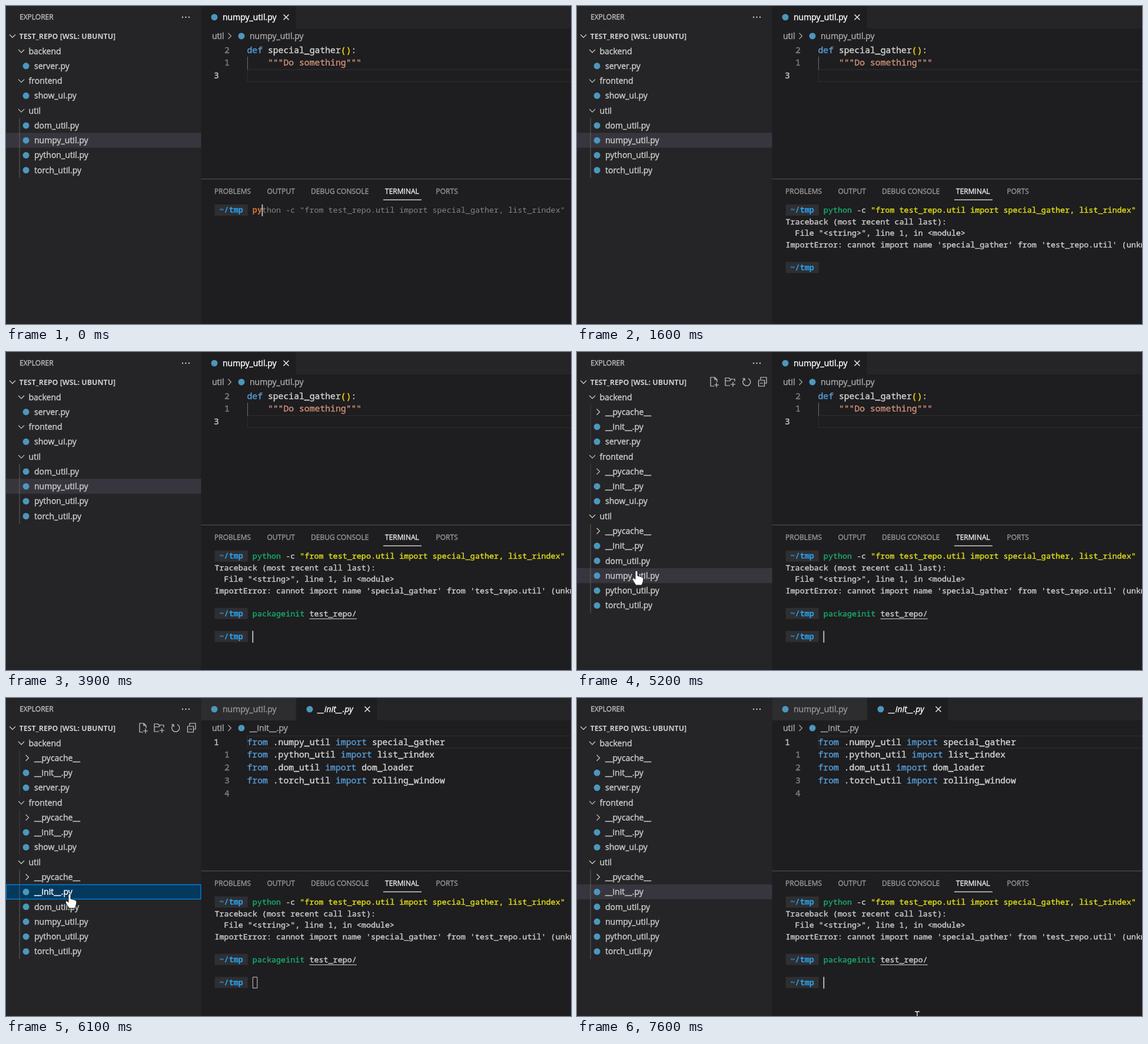
An HTML page with a canvas for the animation above (8000 ms loop, 960 by 540 pixels).

```html
<!DOCTYPE html>
<html lang="en">
<head>
<meta charset="utf-8">
<title>Editor and terminal</title>
<style>
html, body { margin: 0; width: 960px; height: 540px; overflow: hidden; background: #1e1d1f; }
canvas { display: block; }
</style>
</head>
<body>
<canvas width="960" height="540"></canvas>
<script>
const c = document.querySelector('canvas').getContext('2d');
const LOOP = 8000;
const UI = '"Open Sans", "Noto Sans", sans-serif';
const MONO = '"Noto Sans Mono", "DejaVu Sans Mono", monospace';
const LABEL = `14px ${UI}`, CAPS = `12px ${UI}`;
const CODE = `14.75px ${MONO}`, TERM = `13.41px ${MONO}`, TERM_BOLD = `bold ${TERM}`;
const BACK = '#1e1d1f', SIDE = '#252426', SELECTED = '#37363e';
const TEXT = '#ccc', DIM = '#969696', PLAIN = '#d4d4d4', KEY = '#569cd6', STR = '#ce9178';
const GREEN = '#16a96c', YELLOW = '#dede18', GHOST = '#858585', BAD = '#c8743c';

// Moments of the session, in ms
const T = {
  runPython: 100, enter1: 700, trace: 1000, prompt1: 1100, typeP: 1900, typeA: 2000,
  runInit: 2700, enter2: 3400, prompt2: 3800, refresh: 4400, hover: 4500,
  click: 5700, focus: 7400
};

const MOUSE = [[T.hover, 230, 430], [5200, 101, 371], [T.click, 108, 332],
  [6100, 108, 332], [6800, 578, 538]];

const rect = (x, y, w, h, color) => { c.fillStyle = color; c.fillRect(x, y, w, h); };

function line(d, color, width = 1.2) {
  c.strokeStyle = color;
  c.lineWidth = width;
  c.stroke(new Path2D(d));
}

// Draws pairs of string and colour one after another, with a thin outline for weight
function text(x, y, font, ...runs) {
  c.font = font;
  c.lineWidth = 0.4;
  c.lineJoin = 'round';
  for (let i = 0; i < runs.length; i += 2) {
    const [s, color] = runs.slice(i, i + 2);
    c.fillStyle = c.strokeStyle = color;
    c.fillText(s, x, y);
    if (color !== GHOST && !font.startsWith('bold')) c.strokeText(s, x, y);
    x += c.measureText(s).width;
  }
}

function dot(x, y, r, color) {
  c.fillStyle = color;
  c.beginPath();
  c.arc(x, y, r, 0, 7);
  c.fill();
}

const fileIcon = (x, y) => dot(x, y, 5.5, '#4b97bd');
const chevronDown = (x, y) => line(`M${x - 5} ${y - 2.5}l5 5l5-5`, TEXT);
const chevronRight = (x, y, color = TEXT) => line(`M${x - 2.5} ${y - 5}l5 5l-5 5`, color);

function mouseAt(t) {
  const i = MOUSE.findIndex(k => k[0] > t);
  if (i < 0) return MOUSE[MOUSE.length - 1].slice(1);
  const [t0, x0, y0] = MOUSE[i - 1], [t1, x1, y1] = MOUSE[i];
  const p = (t - t0) / (t1 - t0), e = p * p * (3 - 2 * p);
  return [x0 + (x1 - x0) * e, y0 + (y1 - y0) * e];
}

const PACKAGES = [
  ['backend', 'server.py'],
  ['frontend', 'show_ui.py'],
  ['util', 'dom_util.py', 'numpy_util.py', 'python_util.py', 'torch_util.py']
];

function sidebar(t, mouse) {
  const fresh = t >= T.refresh, opened = t >= T.click;
  const rowY = i => 76.5 + 25.28 * i;
  const inTree = mouse && mouse[0] < 331;
  const selected = opened ? 10 : fresh ? 12 : 6;
  const focused = opened && t < T.focus;

  rect(0, 0, 331.5, 540, SIDE);
  text(23, 23, CAPS, 'EXPLORER', '#bbb');
  for (const x of [300, 305.5, 311]) dot(x, 19, 1.2, TEXT);
  chevronDown(11, 51);
  text(22.5, 55.5, `bold 12.4px ${UI}`, 'TEST_REPO [WSL: UBUNTU]', TEXT);
  if (inTree || focused) {
    line('M233 58h-6V43h7l4 4v4M234 43v4h4M237 52v8M233 56h8', TEXT);
    line('M260 57h-8V44h6l2 2h8v4M252 49h8l2-3M265 51v8M261 55h8', TEXT);
    line('M284 46a6.5 6.5 0 1 0 7-1M281 45h4v4', TEXT);
    line('M312 47v-4h10v10h-3M308.5 48h10v10h-10zM311 53h5', TEXT);
  }

  if (inTree) {
    const over = Math.round((mouse[1] - 76.5) / 25.28);
    if (over >= 0 && over < 15) rect(0, rowY(over) - 12.6, 331.5, 25.2, '#2a2d2e');
  }
  const top = rowY(selected) - 12.8;
  rect(0, top, 331.5, 25.3, focused ? '#04395e' : SELECTED);
  if (focused) line(`M.5 ${top + .5}h330.5v24.5H.5z`, '#007fd4', 1.3);

  let row = 0;
  for (const [name, ...files] of PACKAGES) {
    const y = rowY(row++), start = row;
    chevronDown(26, y);
    text(38.5, y + 5, LABEL, name, TEXT);
    if (fresh) files.unshift('__pycache__', '__init__.py');
    for (const file of files) {
      const fy = rowY(row);
      if (file.endsWith('.py')) fileIcon(34, fy);
      else chevronRight(36, fy);
      text(48, fy + 5, LABEL, file, focused && row === selected ? '#fff' : TEXT);
      row++;
    }
    if (name === 'util' || inTree)
      line(`M23 ${rowY(start) - 12.6}V${rowY(row) - 12.6}`, name === 'util' ? '#606060' : '#404040', 1);
  }
}

function editor(opened) {
  const codeY = row => 79.5 + 21.8 * row;
  const lineNumber = (n, row, current) =>
    text(current ? 353 : 371, codeY(row), CODE, String(n), current ? '#c6c6c6' : '#808080');
  const file = opened ? '__init__.py' : 'numpy_util.py';
  const closeX = opened ? 614 : 476;

  rect(331.5, 0, 628.5, 38, SIDE);
  rect(331.5, 0, 161, 38, opened ? '#2d2c2e' : BACK);
  fileIcon(354, 19);
  text(368, 24, LABEL, 'numpy_util.py', opened ? DIM : '#fff');
  if (opened) {
    rect(493.5, 0, 137, 38, BACK);
    fileIcon(516, 19);
    text(530, 24, `italic ${LABEL}`, file, '#fff');
  }
  line(`M${closeX - 4.5} 14.5l9 9m0-9l-9 9`, '#e8e8e8', 1.5);

  text(350, 56, LABEL, 'util', '#a9a9a9');
  chevronRight(380, 51, '#a9a9a9');
  fileIcon(400, 51);
  text(414, 56, LABEL, file, '#a9a9a9');

  c.strokeStyle = '#2b2b2b';
  c.lineWidth = 1.5;
  c.strokeRect(410, opened ? 64.5 : 108, 560, 20.5);

  if (opened) {
    [['numpy_util', 'special_gather'], ['python_util', 'list_rindex'],
     ['dom_util', 'dom_loader'], ['torch_util', 'rolling_window']].forEach(([from, name], i) => {
      text(409.5, codeY(i), CODE, 'from', KEY, ` .${from} `, PLAIN, 'import', KEY, ` ${name}`, PLAIN);
    });
    for (let i = 0; i < 5; i++) lineNumber(i || 1, i, !i);
  } else {
    text(409.5, codeY(0), CODE, 'def', KEY, ' special_gather', PLAIN, '()', '#ffd700', ':', PLAIN);
    text(409.5, codeY(1), CODE, '    """Do something"""', STR);
    line('M410.5 86V108', '#707070', 1);
    [2, 1, 3].forEach((n, i) => lineNumber(n, i, i === 2));
  }
}

const LEFT = 354.5, CELL = 8.045;
const PYTHON = 'python -c "from test_repo.util import special_gather, list_rindex"';
const INIT = 'packageinit test_repo/';
const termX = col => LEFT + CELL * col;
const termY = row => 351 + 19.5 * row;

function prompt(row) {
  rect(LEFT, termY(row) - 14, CELL * 7, 19, '#2e2f32');
  text(termX(1), termY(row), TERM_BOLD, '~/tmp', '#2aa1ee');
}

function typing(row, command, count) {
  text(termX(8), termY(row), TERM_BOLD, command.slice(0, count), BAD);
  text(termX(8 + count), termY(row), TERM, command.slice(count), GHOST);
}

function cursor(row, col, hollow) {
  const x = termX(col), y = termY(row) - 14;
  if (hollow) line(`M${x + .5} ${y + .5}h7.5v18.5h-7.5z`, TEXT, 1);
  else rect(x - .3, y, 1.6, 20, '#d8d8d8');
}

function terminal(t) {
  rect(331.5, 293, 628.5, 1.3, '#4a4a4c');
  [['PROBLEMS', 354], ['OUTPUT', 443.5], ['DEBUG CONSOLE', 518], ['TERMINAL', 644], ['PORTS', 730.5]]
    .forEach(([name, x]) => text(x, 319, CAPS, name, name === 'TERMINAL' ? '#e7e7e7' : DIM));
  rect(641, 328.5, 65, 1.3, '#e7e7e7');

  prompt(0);
  if (t < T.runPython) typing(0, PYTHON, 2);
  else text(termX(8), termY(0), TERM, 'python', GREEN, ' -c ', TEXT, PYTHON.slice(10), YELLOW);

  if (t >= T.trace) {
    ['Traceback (most recent call last):',
     '  File "<string>", line 1, in <module>',
     "ImportError: cannot import name 'special_gather' from 'test_repo.util' (unknown location)"]
      .forEach((s, i) => text(LEFT, termY(i + 1), TERM, s, TEXT));
  }
  if (t >= T.prompt1) prompt(5);
  if (t >= T.runInit) {
    text(termX(8), termY(5), TERM, 'packageinit', GREEN, ' test_repo/', TEXT);
    rect(termX(20), termY(5) + 4, CELL * 10, 1.1, TEXT);
  } else if (t >= T.typeA) typing(5, INIT, 2);
  else if (t >= T.typeP) typing(5, PYTHON, 1);
  if (t >= T.prompt2) prompt(7);

  if (t < T.runPython) cursor(0, 10);
  else if (t < T.enter1) cursor(0, 8 + PYTHON.length);
  else if (t < T.trace) cursor(1, 0);
  else if (t < T.prompt1) cursor(4, 0);
  else if (t < T.typeP) { if (t < 1600) cursor(5, 8); }
  else if (t < T.typeA) cursor(5, 9);
  else if (t < T.runInit) cursor(5, 10);
  else if (t < T.enter2) cursor(5, 8 + INIT.length);
  else if (t < T.prompt2) cursor(6, 0);
  else if (t < T.click) { if (t < 4400 || t >= 4900 && t < 5400) cursor(7, 8); }
  else cursor(7, 8, t < T.focus);
}

function pointer([x, y]) {
  c.save();
  c.translate(x, y);
  if (x < 331) {
    const hand = new Path2D('M-2 2Q0-2 2 2V9L9 11Q12 12 12 15L11 20L9 25H-1L-6 17Q-8 12-4 13L-2 15Z');
    c.fillStyle = '#fff';
    c.fill(hand);
    c.strokeStyle = '#222';
    c.lineWidth = 1;
    c.stroke(hand);
  } else line('M-4-5.5h3l1 1l1-1h3M0-4.5V9.5M-4 10.5h3l1-1l1 1h3', '#eee', 1.4);
  c.restore();
}

function draw() {
  const t = performance.now() % LOOP;
  const mouse = t >= T.hover ? mouseAt(t) : null;
  rect(0, 0, 960, 540, BACK);
  editor(t >= T.click);
  terminal(t);
  sidebar(t, mouse);
  if (mouse) pointer(mouse);
  requestAnimationFrame(draw);
}
draw();
</script>
</body>
</html>
```
